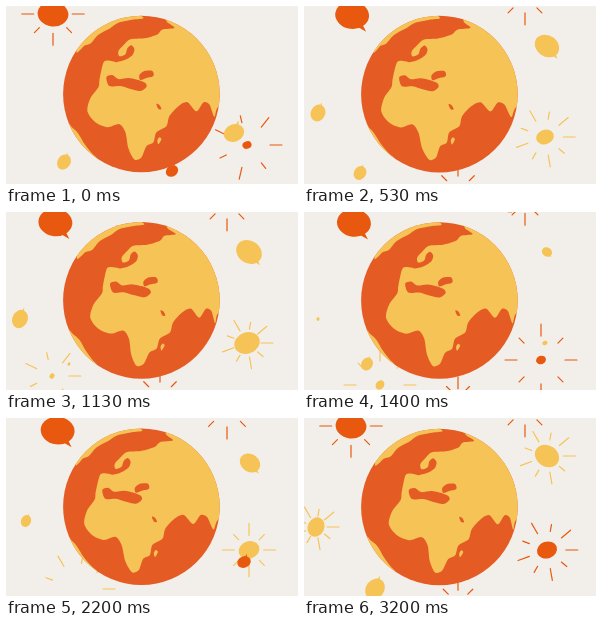
An HTML page that plays this animation: 292x178 px, repeating every 3270 ms.

```html
<!DOCTYPE html>
<html lang="en">
<head>
<meta charset="utf-8">
<title>Globe with speech bubbles</title>
<style>
html, body { margin: 0; width: 100%; height: 100%; overflow: hidden; background: #f2efea; }
svg { display: block; width: 100%; height: 100%; }
</style>
</head>
<body>
<svg viewBox="0 0 292 178">
  <clipPath id="disc"><circle cx="135" cy="88" r="78.3"/></clipPath>
  <g id="rays" fill="none" stroke-width="1.2" stroke-linecap="round"></g>
  <g id="globe">
    <circle cx="135" cy="88" r="78.3" fill="#e55b24"/>
    <g id="land" clip-path="url(#disc)"></g>
  </g>
  <g id="bubbles"></g>
</svg>
<script>
const LOOP = 3270, STEP = 66.6, LAST = 48;
const GROW = 10, SHRINK = 5, RAY_LIFE = 14;
const ORANGE = '#e8590f', SEA = '#e55b24', YELLOW = '#f6c357';

const byId = id => document.getElementById(id);
const clamp = v => Math.min(1, Math.max(0, v));
const fix = v => v.toFixed(2);

function addPath(parent, attrs) {
  const node = document.createElementNS('http://www.w3.org/2000/svg', 'path');
  for (const name in attrs) node.setAttribute(name, attrs[name]);
  return byId(parent).appendChild(node);
}

function polar(x, y, r, degrees) {
  const a = degrees * Math.PI / 180;
  return [fix(x + r * Math.cos(a)), fix(y + r * Math.sin(a))];
}

// Closed curve with rounded corners through the points.
function smooth(pts) {
  const at = i => pts[(i + pts.length) % pts.length];
  const curves = pts.map((p, i) => {
    const before = at(i - 1), next = at(i + 1), after = at(i + 2);
    const c1 = p.map((v, n) => fix(v + (next[n] - before[n]) / 7));
    const c2 = next.map((v, n) => fix(v - (after[n] - p[n]) / 7));
    return `C${c1} ${c2} ${next.map(fix)}`;
  });
  return `M${pts[0].map(fix)}${curves.join('')}Z`;
}

const shapes = [
  // Eurasia and Africa
  [YELLOW, '166,4 225,4 230,100 212,101 208,111 203,99 197,97 190,106 181,97 172,101 163,111 160,121 150,127 147,137 140,141 135,152 128,154 122,143 119,127 113,119 101,122 89,117 81,106 84,93 92,82 93,75 95,65 98,56 106,56 110,57 118,55 126,50 128,44 125,40 121,43 119,49 113,51 112,46 117,40 124,34 138,33 151,29 156,24 168,22 160,15'],
  // Greenland and South America on the western rim
  [YELLOW, '70,46 78,40 84,38 92,29 103,23 112,17 126,14 137,12 120,4 80,14'],
  [YELLOW, '60,118 66,122 72,128 78,138 85,147 91,154 80,160 50,145'],
  // Madagascar
  [YELLOW, '151,135 153,132 155,134 152,139'],
  // Mediterranean, Black Sea and Red Sea
  [SEA, '100,72 106,70 112,74 122,73 132,75 139,78 140,82 134,86 124,84 114,81 103,81'],
  [SEA, '133,70 138,66 146,66 147,71 140,73 134,75'],
  [SEA, '150,99 153,100 155,104 152,104']
].map(([fill, text]) => ({
  points: text.split(' ').map(p => p.split(',').map(Number)),
  node: addPath('land', { fill })
}));

// Eastward turn of the globe at evenly spaced moments.
const sway = [0, -6, 5, -1.5, -4, -9, 5];

function drawGlobe(step) {
  const pos = step / LAST * (sway.length - 1);
  const i = Math.min(sway.length - 2, Math.floor(pos));
  const turn = sway[i] + (sway[i + 1] - sway[i]) * (pos - i);
  byId('globe').setAttribute('transform', `translate(.4 ${fix(step / LAST)})`);
  for (const { points, node } of shapes) {
    // Points near the rim of the sphere move less.
    node.setAttribute('d', smooth(points.map(([x, y]) => {
      const depth = Math.sqrt(Math.max(0, 1 - Math.hypot(x - 135, y - 88) ** 2 / 6084));
      return [x + turn * depth, y - depth];
    })));
  }
}

const bubbles = [];

// A bubble lives from step "from" to step "to"; its rays draw in while it grows.
function bubble(fill, x, y, size, from, to, rays = 0, drift = 0) {
  const top = y < 88;
  bubbles.push({
    x, y, size, from, to, rays, drift,
    turn: top ? x / 7 : x / 5 - 68,
    tail: top ? 50 : -70,
    body: addPath('bubbles', { fill }),
    burst: addPath('rays', { stroke: fill })
  });
}

// Top left
bubble(ORANGE, 47, 8, 17, -7, 46, 8, .14);
bubble(ORANGE, 47, 8, 17, 41, 60, 8);
// Top right
bubble(YELLOW, 243, 40, 13.5, 0, 23);
bubble(YELLOW, 244, 45, 12, 26, 38);
bubble(YELLOW, 243, 38, 14, 41, 60, 9);
bubble(ORANGE, 204, -4, 10, 18, 30);
// Left
bubble(YELLOW, 14, 107, 9.5, 1, 22);
bubble(YELLOW, 20, 103, 8.5, 26, 37);
bubble(YELLOW, 12, 109, 10, 37, 60, 9);
// Bottom left
bubble(YELLOW, 58, 156, 10, -15, 4);
bubble(YELLOW, 56, 167, 8, 1, 15);
bubble(YELLOW, 46, 164, 8, 14.5, 21, 7);
bubble(YELLOW, 63, 152, 9, 16, 29);
bubble(YELLOW, 76, 173, 14, 19, 30, 8);
bubble(YELLOW, 71, 171, 11, 33, 60, 9);
bubble(YELLOW, 70, 146, 5.5, 34, 46);
// Bottom right
bubble(YELLOW, 228, 127, 10.5, -15, 5);
bubble(ORANGE, 241, 139, 13, -2, 7, 7);
bubble(YELLOW, 241, 131, 13, 3.5, 22, 9);
bubble(ORANGE, 237, 148, 14, 19, 31, 8);
bubble(YELLOW, 243, 132, 13.5, 24, 37, 8);
bubble(ORANGE, 238, 144, 13.5, 30, 46);
bubble(ORANGE, 243, 132, 14, 43.2, 60, 9);
// Just outside the upper and lower edges
bubble(ORANGE, 166, 165, 6.5, -15, 6);
for (const from of [5, 14, 31, 45]) bubble(ORANGE, 221, -10, 9, from, from + 9, 8);
for (const from of [6, 15, 45]) bubble(ORANGE, 154, 186, 6, from, from + 9, 8);

function bodyPath({ x, y, turn, tail }, r, full) {
  if (r < .3) return '';
  const a = polar(x, y, r, turn), b = polar(x, y, r, turn + 180);
  const arc = `A${fix(r)} ${fix(r * .83)} ${fix(turn)} 0 1 `;
  const oval = `M${a}${arc}${b}${arc}${a}Z`;
  if (!full) return oval;
  return `${oval}M${polar(x, y, r * .7, tail - 12)}L${polar(x, y, r * 1.28, tail)}L${polar(x, y, r * .7, tail + 18)}Z`;
}

function burstPath({ x, y, size, rays }, growth) {
  const inner = size + 1 + 14 * (1 - growth) ** 2;
  let d = '';
  for (let i = 0; i < rays; i++) {
    const angle = i * 360 / rays;
    d += `M${polar(x, y, inner, angle)}L${polar(x, y, inner + (i % 2 ? 7 : 12), angle)}`;
  }
  return d;
}

function drawBubble(b, step) {
  const age = step - b.from;
  const alive = age >= 0 && step < b.to;
  const growth = clamp(age / GROW);
  const r = b.size * (1 - (1 - growth) ** 2) * clamp((b.to - step) / SHRINK);
  const moved = { ...b, x: b.x + b.drift * Math.max(0, step), y: b.y + b.drift * Math.max(0, step) };
  b.body.setAttribute('d', alive ? bodyPath(moved, r, age > RAY_LIFE || !b.rays) : '');
  b.burst.setAttribute('d', alive && age < RAY_LIFE ? burstPath(moved, growth) : '');
}

function render(time) {
  const step = Math.min(LAST, Math.floor((time % LOOP + 10) / STEP));
  drawGlobe(step);
  for (const b of bubbles) drawBubble(b, step);
}

const start = performance.now();
function tick() {
  render(performance.now() - start);
  requestAnimationFrame(tick);
}
tick();
</script>
</body>
</html>
```
